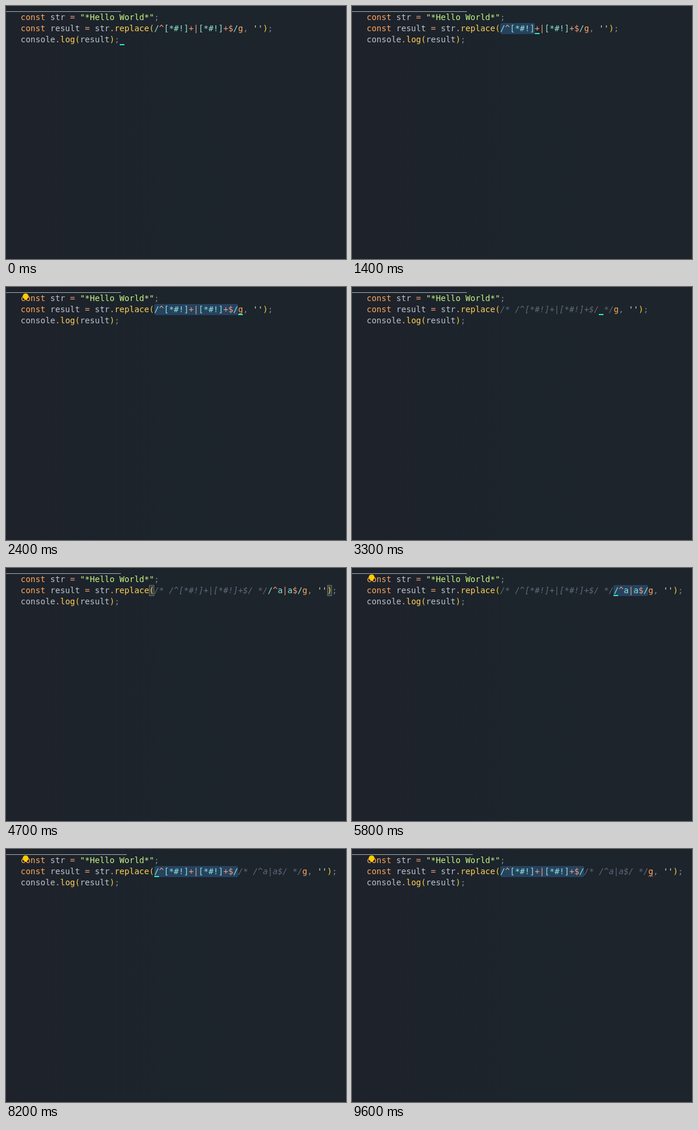
An HTML page for the animation above (9800 ms loop, 580x432 px).

```html
<!DOCTYPE html>
<html lang="en">
<head>
<meta charset="utf-8">
<title>Toggling block comments</title>
<style>
html, body { margin: 0; width: 100%; height: 100%; overflow: hidden; background: #1d232b; }
#stage {
  position: relative; width: 580px; height: 432px; overflow: hidden;
  background: linear-gradient(90deg, #1e222b, #1c242c 50%, #1d242c);
  font: 14px/19px "DejaVu Sans Mono", monospace; color: #bfc4cc;
}
#stage > * { position: absolute; }
.line { left: 25px; white-space: pre; }
.k { color: #ffa759; } .o { color: #f29e74; } .s { color: #c6f582; }
.f { color: #ffd057; } .b { color: #f5cf3e; } .p { color: #7b8490; }
.r { color: #8fe3d6; } .q { color: #c5e6c0; }
.c { color: #5f6a79; font-style: italic; }
#rule { left: 0; top: 9px; height: 1px; background: #a7b1b0; }
#selection { height: 19px; border-radius: 3px; background: #25425f; }
.pair { width: 1ch; height: 19px; top: 29px; box-sizing: border-box; border: 1px solid #686d68; background: #353d42; }
#cursor { width: 8px; height: 2px; background: #2eecc0; }
#bulb, #squiggle { left: 0; top: 0; }
</style>
</head>
<body>
<div id="stage">
  <div id="selection"></div>
  <div class="pair"></div><div class="pair"></div>
  <div class="line" style="top:10px"></div>
  <div class="line" style="top:29px"></div>
  <div class="line" style="top:48px"></div>
  <div id="rule"></div>
  <div id="cursor"></div>
  <svg id="squiggle" width="580" height="60" fill="none" stroke="#f0605f">
    <path d="M505.5 47.5l2-2 2 2 2-2 2 2"/>
  </svg>
  <svg id="bulb" width="60" height="30" fill="#ffcc00">
    <circle cx="33.5" cy="16" r="5"/><path d="M31.5 20h4v2h-4z"/>
  </svg>
</div>
<script>
const LOOP = 9800;
const $ = selector => document.querySelector(selector);
const lines = document.querySelectorAll('.line');
const pairs = document.querySelectorAll('.pair');

const span = (kind, text) => `<span class="${kind}">${text}</span>`;
const regex = text => text.replace(/[+|^$]|[^+|^$]+/g,
  part => span(/[+|^$]/.test(part) ? 'o' : 'r', part));
const comment = text => span('c', `/* ${text} */`);
const end = span('p', ';');

const TRIM = '/^[*#!]+|[*#!]+$/', EDGE = '/^a|a$/';
const docs = {
  plain: regex(TRIM),
  noted: comment(TRIM),
  added: comment(TRIM) + regex(EDGE),
  both: comment(TRIM) + comment(EDGE),
  swapped: regex(TRIM) + comment(EDGE)
};
const callLine = pattern => `${span('k', 'const')} result ${span('o', '=')} str${span('o', '.')}` +
  span('f', 'replace') + span('b', '(') + pattern + span('k', 'g') + span('p', ',') + ' ' +
  span('q', "''") + span('b', ')') + end;

lines[0].innerHTML = `${span('k', 'const')} str ${span('o', '=')} ${span('s', '"*Hello World*"')}${end}`;
lines[2].innerHTML = `console${span('o', '.')}${span('f', 'log')}${span('b', '(')}result${span('b', ')')}${end}`;

// Each step lists only what changes; anchor null means no selection.
const steps = [];
let state = { doc: 'plain', row: 2, col: 20, anchor: null, ink: 1, bulb: false, pair: 0, rule: 196, error: false };
const at = (time, change) => steps.push({ ...(state = { ...state, ...change }), time });
const keys = (time, cols, change = {}) =>
  cols.forEach((col, i) => at(time + i * 100, { ...change, col }));
const fade = (time, ink) => at(time, { ink });

at(0, {});
fade(100, .5);
at(300, { row: 1, ink: 1 });
at(500, { col: 22 });
at(700, { col: 24 });
at(800, { col: 25 });
at(1100, { col: 27, pair: 49 });
keys(1200, [28, 31, 34, 37, 41, 44, 47, 50], { anchor: 27, pair: 0 });
at(2000, { col: 47, bulb: true });
at(2200, { col: 45, bulb: false });
at(2400, { col: 44, bulb: true });

at(2700, { doc: 'noted', anchor: 30, col: 47 });
fade(2900, .5);
fade(3000, 1);
keys(3300, [47, 48, 50], { anchor: null, bulb: false });
at(3800, { doc: 'added', col: 57 });
at(4200, { col: 58 });
fade(4300, .5);
fade(4400, 0);

at(4700, { col: 63, pair: 62 });
fade(4800, 1);
keys(4900, [61, 59, 57], { pair: 0 });
keys(5200, [56, 55, 54, 52, 50], { anchor: 57 });
at(5700, { bulb: true });

at(6000, { doc: 'both', anchor: 60, col: 53 });
at(6200, { bulb: false });
keys(6500, [53, 50], { anchor: null });
keys(6700, [46, 40, 34, 30, 27], { anchor: 50 });
at(7300, { bulb: true });

at(7600, { doc: 'swapped', anchor: 44, col: 27 });
at(8200, { rule: 206 });
at(8600, { error: true });
fade(8800, .5);
fade(8900, 0);
fade(9200, .5);
fade(9300, 1);
fade(9500, .5);
fade(9600, 0);

const colX = col => `calc(25px + ${col}ch)`;
const show = (element, visible) => element.style.display = visible ? '' : 'none';
const place = (element, styles) => Object.assign(element.style, styles);

function render(step) {
  const { row, col, anchor } = step;
  lines[1].innerHTML = callLine(docs[step.doc]);
  place($('#cursor'), { left: colX(col), top: `${27 + row * 19}px`, opacity: step.ink });
  show($('#selection'), anchor !== null);
  place($('#selection'), {
    top: '29px', left: colX(Math.min(anchor, col)), width: `${Math.abs(anchor - col)}ch`
  });
  [26, step.pair].forEach((position, i) => {
    show(pairs[i], step.pair);
    place(pairs[i], { left: colX(position) });
  });
  show($('#bulb'), step.bulb);
  show($('#squiggle'), step.error);
  place($('#rule'), { width: `${step.rule}px` });
}

const started = performance.now();
let current;
function frame() {
  const time = (performance.now() - started) % LOOP;
  const step = steps.findLast(item => item.time <= time) || steps[0];
  if (step !== current) render(current = step);
  requestAnimationFrame(frame);
}
frame();
</script>
</body>
</html>
```
